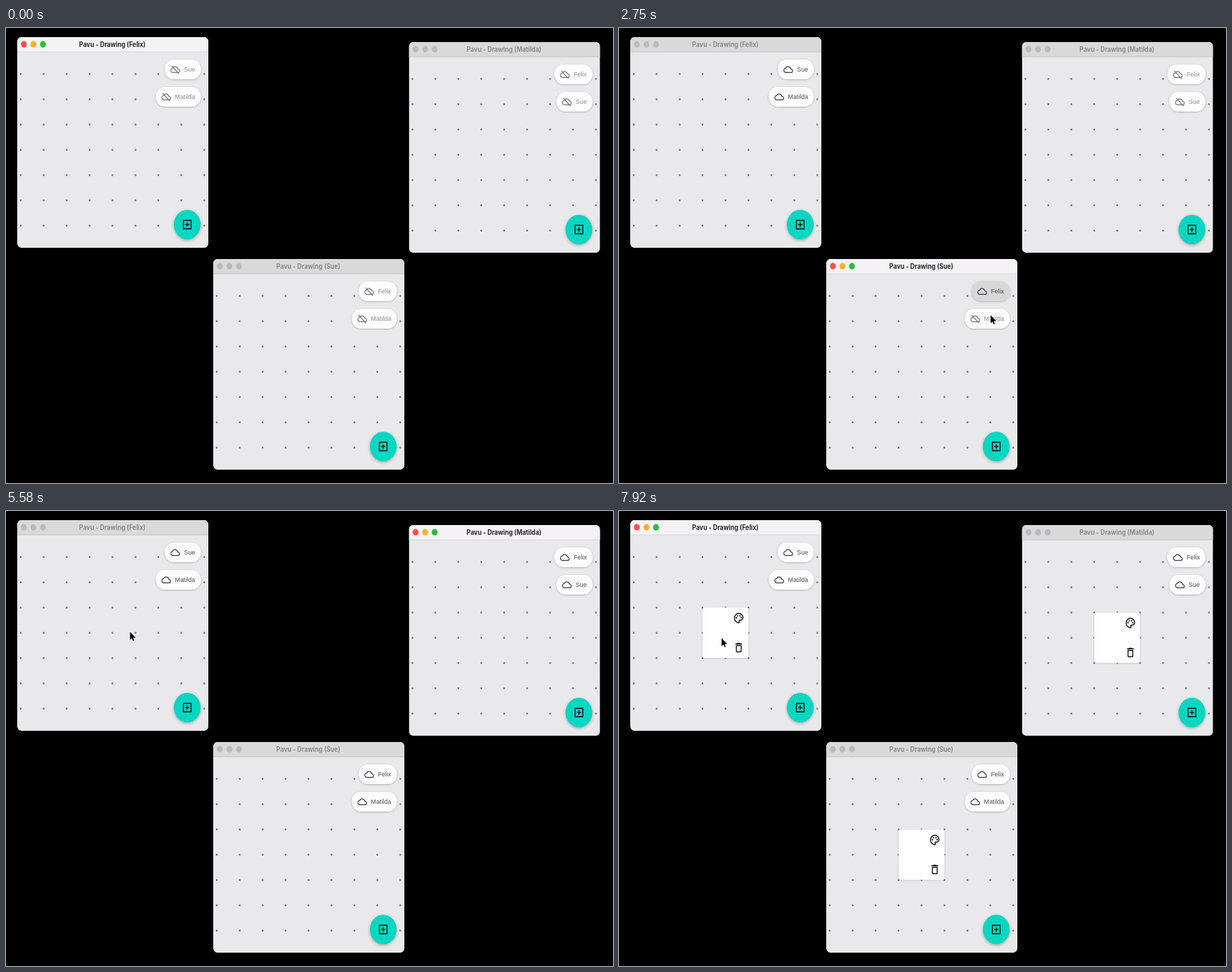
An HTML page with a canvas that plays this animation: 864x648 px, repeating every 8 s.

```html
<!DOCTYPE html>
<html lang="en">
<head>
<meta charset="utf-8">
<title>Shared drawing</title>
<style>
  html, body { margin: 0; height: 100%; overflow: hidden; background: #000; }
  canvas { display: block; }
</style>
</head>
<body>
<canvas id="stage" width="864" height="648"></canvas>
<script>
const ctx = document.getElementById('stage').getContext('2d');
const LOOP = 8000;
const SIZE = 300;          // every window is square, then squeezed sideways
const SQUEEZE = 0.907;
const GRID = 36;

const CLOUD = new Path2D('M19 19H6a5 5 0 0 1-.4-10A7 7 0 0 1 18.4 11 4 4 0 0 1 19 19z');
const SLASH = new Path2D('M3 4l18 18');
const ADD_BOX = new Path2D('M4 4h16v16H4zM12 7.5v9M7.5 12h9');
const PALETTE = new Path2D('M12 21a9 9 0 1 1 9-10c0 3-2.5 5-5 5h-2a1.5 1.5 0 0 0-1 2.5c.6 1 .3 2.5-1 2.5z');
const TRASH = new Path2D('M16 9v10H8V9h8m-1.5-6h-5l-1 1H5v2h14V4h-3.5l-1-1zM18 7H6v12c0 1.1.9 2 2 2h8c1.1 0 2-.9 2-2V7z');
const POINTER = new Path2D('M0 0V11.5L2.6 9.2 4.3 13 6 12.2 4.4 8.6H8z');

// Chips list the other people and the moment each one is clicked.
const windows = [
  { owner: 'Felix', x: 16, y: 13, active: [[0, 2500], [6500, LOOP]], cardAt: 6580, addAt: 6500,
    chips: [['Sue', 1000], ['Matilda', 1600]] },
  { owner: 'Matilda', x: 573.5, y: 20, active: [[4160, 6500]], cardAt: 6660,
    chips: [['Felix', 4160], ['Sue', 4750]] },
  { owner: 'Sue', x: 295, y: 329, active: [[2500, 4160]], cardAt: 6660,
    chips: [['Felix', 2500], ['Matilda', 3000]] }
];

// time, x, y of the pointer tip
const pointerPath = [
  [330, 300, 335], [850, 250, 62], [1080, 250, 62], [1320, 240, 103], [1750, 240, 103],
  [2330, 534, 372], [2520, 534, 372], [2720, 529, 409], [3300, 529, 409],
  [4000, 800, 66], [4200, 800, 66], [4420, 794, 93], [4600, 800, 103], [4950, 800, 103],
  [5560, 176.5, 172], [5900, 176.5, 172], [6350, 256.5, 279], [7150, 256.5, 279],
  [7800, 146, 181], [LOOP, 146, 181]
];

const ripple = age => age < 0 ? 0 : 0.15 * Math.min(1, Math.max(0, (500 - age) / 250));

function roundRect(x, y, w, h, r, fill) {
  ctx.beginPath();
  ctx.roundRect(x, y, w, h, r);
  ctx.fillStyle = fill;
  ctx.fill();
}

function disc(x, y, r, fill) {
  ctx.beginPath();
  ctx.arc(x, y, r, 0, 2 * Math.PI);
  ctx.fillStyle = fill;
  ctx.fill();
}

function text(string, x, y, font, color, align) {
  ctx.font = font;
  ctx.fillStyle = color;
  ctx.textAlign = align;
  ctx.fillText(string, x, y);
}

function shadowed(blur, offset, alpha, draw) {
  ctx.save();
  ctx.shadowColor = `rgba(0,0,0,${alpha})`;
  ctx.shadowBlur = blur;
  ctx.shadowOffsetY = offset;
  draw();
  ctx.restore();
}

// Draws inside a 24-unit icon box centred on x, y.
function icon(x, y, size, color, draw) {
  ctx.save();
  ctx.translate(x - size / 2, y - size / 2);
  ctx.scale(size / 24, size / 24);
  ctx.strokeStyle = ctx.fillStyle = color;
  ctx.lineWidth = 2;
  draw();
  ctx.restore();
}

function drawChip(name, clickAt, row, t) {
  const font = '9.75px "Liberation Sans", Arial, sans-serif';
  const linked = t >= clickAt;
  const color = linked ? '#4c4c50' : '#8b8b8d';
  const right = 288.3, y = 32 + row * 39;
  ctx.font = font;
  const width = ctx.measureText(name).width + 39.7;
  const left = right - width;
  shadowed(2.5, 0.7, 0.28, () => roundRect(left, y, width, 28, 14, '#fefefe'));
  roundRect(left, y, width, 28, 14, `rgba(0,0,0,${ripple(t - clickAt)})`);
  icon(left + 16.8, y + 14, 15, linked ? '#3c3c44' : '#77777a', () => {
    ctx.stroke(CLOUD);
    if (!linked) ctx.stroke(SLASH);
  });
  text(name, right - 9.3, y + 17.3, font, color, 'right');
}

function drawCard() {
  const x = 5.5 + 3 * GRID, y = 52.5 + 2 * GRID;
  shadowed(2, 0.5, 0.25, () => roundRect(x, y, 72, 72, 3, '#fefefe'));
  icon(x + 56.8, y + 15, 18, '#111', () => {
    ctx.stroke(PALETTE);
    for (const [dx, dy] of [[7, 11.5], [9.5, 7.8], [14.5, 7.8], [17, 11.5]]) disc(dx, dy, 1.5, '#111');
  });
  icon(x + 56.8, y + 57, 18, '#111', () => ctx.fill(TRASH));
}

function drawWindow({ owner, x, y, active, cardAt, addAt = Infinity, chips }, t) {
  const focused = active.some(([from, to]) => t >= from && t < to);
  ctx.save();
  ctx.translate(x, y);
  ctx.scale(SQUEEZE, 1);
  ctx.beginPath();
  ctx.roundRect(0, 0, SIZE, SIZE, 6.5);
  ctx.clip();

  ctx.fillStyle = '#e9e9eb';
  ctx.fillRect(0, 0, SIZE, SIZE);
  ctx.fillStyle = focused ? '#f4f2f4' : '#d9d9d9';
  ctx.fillRect(0, 0, SIZE, 21);
  ctx.fillStyle = focused ? '#d8d8da' : '#c6c6c8';
  ctx.fillRect(0, 20.5, SIZE, 1);
  ['#ff4f48', '#fdb22b', '#28bd3c'].forEach((light, i) =>
    disc(10.4 + i * 15, 10.2, 4.6, focused ? light : '#bbbbbd'));
  text(`Pavu - Drawing (${owner})`, 149.2, 13.7, 'bold 9.75px Inter, "Liberation Sans", sans-serif',
    focused ? '#29292b' : '#8c8c8e', 'center');

  for (let col = 0; col < 9; col++)
    for (let row = 0; row < 7; row++)
      disc(5.5 + col * GRID, 52.5 + row * GRID, 1.5, '#808083');

  if (t >= cardAt) drawCard();
  chips.forEach(([name, clickAt], row) => drawChip(name, clickAt, row, t));

  shadowed(4, 1.5, 0.3, () => disc(266.8, 267, 21, '#06d7c2'));
  disc(266.8, 267, 21, `rgba(0,0,0,${ripple(t - addAt)})`);
  icon(266.8, 267, 18, '#06100f', () => ctx.stroke(ADD_BOX));
  ctx.restore();
}

function drawPointer(t) {
  const next = pointerPath.findIndex(key => key[0] > t);
  if (next < 1) return;
  const [t0, x0, y0] = pointerPath[next - 1];
  const [t1, x1, y1] = pointerPath[next];
  const p = (t - t0) / (t1 - t0);
  const ease = p * p * (3 - 2 * p);
  ctx.save();
  ctx.translate(x0 + (x1 - x0) * ease, y0 + (y1 - y0) * ease);
  ctx.lineWidth = 1.2;
  ctx.strokeStyle = 'rgba(255,255,255,.8)';
  ctx.stroke(POINTER);
  ctx.fillStyle = '#000';
  ctx.fill(POINTER);
  ctx.restore();
}

function frame() {
  const t = performance.now() % LOOP;
  ctx.fillStyle = '#000';
  ctx.fillRect(0, 0, 864, 648);
  windows.forEach(win => drawWindow(win, t));
  drawPointer(t);
  requestAnimationFrame(frame);
}
frame();
</script>
</body>
</html>
```
